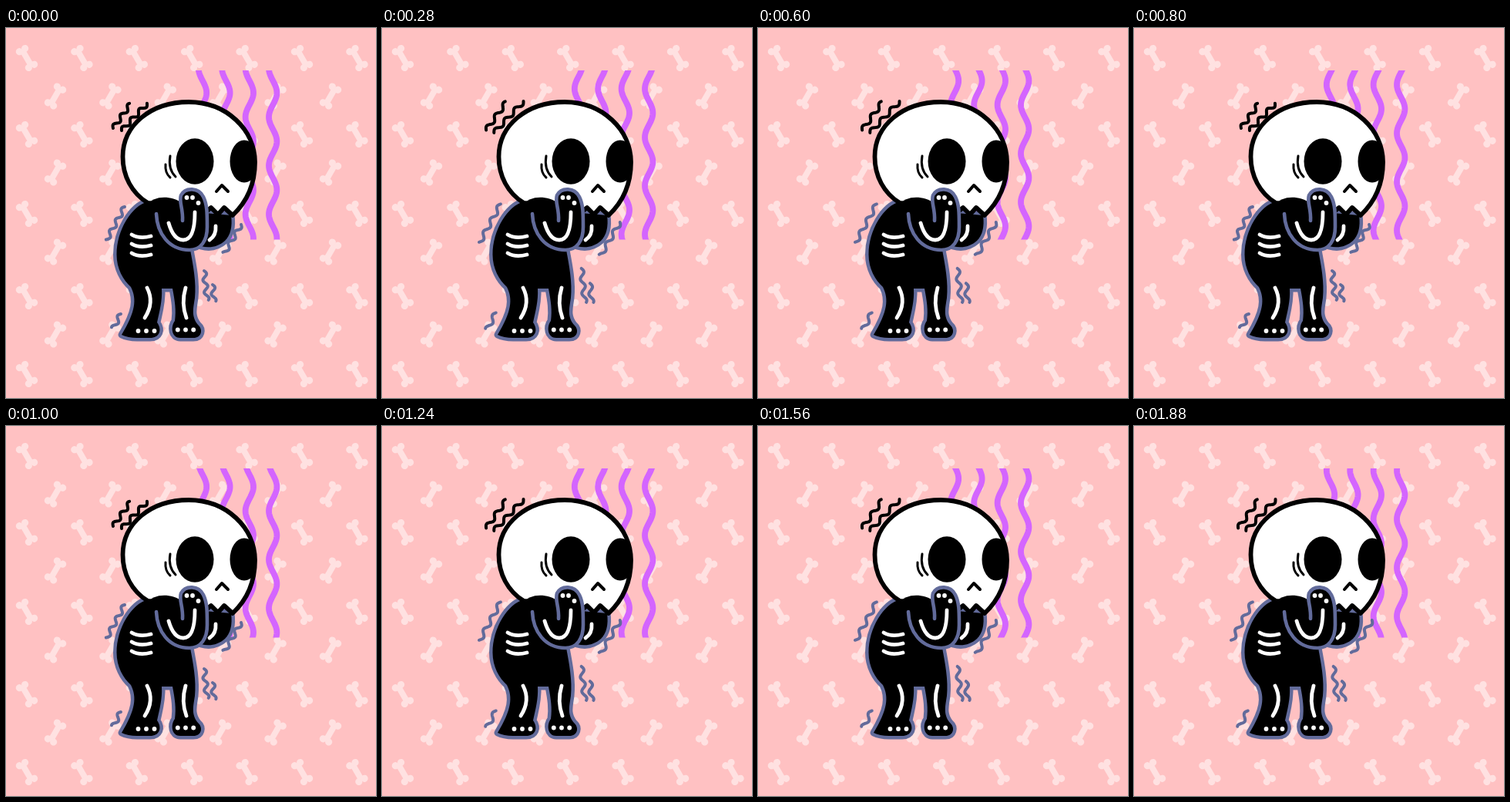
An HTML page that plays this animation: 480x480 px, repeating every 1.92 s.

```html
<!DOCTYPE html>
<html lang="en">
<head>
<meta charset="utf-8">
<title>Shivering skeleton</title>
<style>
  html, body { margin: 0; width: 100%; height: 100%; overflow: hidden; background: #ffc1c2; }
  svg { display: block; width: 100vw; height: 100vh; }
  .line { fill: none; stroke-linecap: round; stroke-linejoin: round; }
  .white { stroke: #fff; stroke-width: 4.8; }
  .ink { stroke: #000; }
  .slate { stroke: #626b9b; }
  .limb { fill: #000; stroke: #626b9b; stroke-width: 9; stroke-linejoin: round; paint-order: stroke; }
</style>
</head>
<body>
<svg viewBox="0 0 480 480">
  <defs>
    <g id="bone" fill="#ffe1e1">
      <rect x="-3.8" y="-13" width="7.6" height="26"/>
      <circle cx="-4.2" cy="-12" r="4.6"/><circle cx="4.2" cy="-12" r="4.6"/>
      <circle cx="-4.2" cy="12" r="4.6"/><circle cx="4.2" cy="12" r="4.6"/>
    </g>
    <clipPath id="band"><rect x="230" y="55" width="140" height="219.5"/></clipPath>
    <clipPath id="face"><use href="#skull"/></clipPath>
    <path id="skull" d="M237 96 C286 96 323 132 323 174 C323 203 312 226 294 243
      L283 233 L275 242 L266 233 L260 238 L226 232 L184 227
      C163 214 151.5 192 151.5 167 C151.5 126 188 96 237 96Z"/>
  </defs>

  <g id="bones"></g>
  <g clip-path="url(#band)"><g id="steam" class="line" stroke="#d465ff" stroke-width="7.8"></g></g>
  <g id="marksIn"></g>
  <g id="marksOut"></g>

  <!-- body and legs -->
  <path class="limb" d="M184 225 C163 231 143.5 262 143.5 294 C143.5 312 152 327 162 336
    C170 352 168 368 150 398 Q158 402 170 402 H187 C199 402 203 392 196 382
    C199 368 203 354 202 338 H216 C219 354 221 366 219 380 C213 388 215 402 226 402
    H243 C254 402 256 391 249 385 C240 374 243 364 245 350 C247 330 243 309 239 288
    L238 224Z"/>

  <!-- far hand -->
  <path class="limb" d="M258 240 L292 243 C294 258 291 269 284 276 C275 284 264 286 253 283Z"/>
  <path class="line white" d="M272 257 Q273 269 264 275"/>

  <!-- head -->
  <use href="#skull" fill="#fff" stroke="#000" stroke-width="5.8" stroke-linejoin="round"/>
  <g clip-path="url(#face)">
    <ellipse cx="245" cy="173" rx="24.5" ry="29.7"/>
    <ellipse cx="309" cy="173" rx="18.5" ry="27.5"/>
  </g>
  <path class="line ink" stroke-width="4" d="M273 212 L280 204 L288 212"/>
  <path class="line ink" stroke-width="3" d="M207 177 Q206 188 213 194 M213 166 Q210 183 220 193"/>

  <!-- shoulder and near arm -->
  <path d="M182 230 C192 217 214 217 228 227 L230 256 L198 264Z"/>
  <path class="line slate" stroke-width="4.6" style="fill:#000" d="M195 241 C196 266 211 288 238 288
    C253 288 261 276 261 258 C261 240 261 229 256 219 C250 207 233 206 227 217
    C224 226 230 234 229 250"/>
  <path class="line white" d="M211 253 C215 267 221 275 230 275 C240 275 245 262 245 239"/>

  <g id="ribs" class="line white"></g>
  <path class="line white" d="M183 337 Q193 356 180 376 M233 337 Q227 357 234 376"/>
  <g id="tips" fill="#fff"></g>
</svg>
<script>
const FRAME = 40, LOOP = 48, RISE = 12, HOLD = 2;
const WAVE = 63, SWAY = 5.2, PEAK = 84;
const $ = id => document.getElementById(id);

function add(parent, tag, attrs) {
  const el = document.createElementNS("http://www.w3.org/2000/svg", tag);
  for (const key in attrs) el.setAttribute(key, attrs[key]);
  return parent.appendChild(el);
}

const toPath = pts => "M" + pts.map(p => p.map(v => v.toFixed(2)).join(" ")).join("L");

// Wallpaper: each row is followed by one tilted the other way, half a column across.
function boneRow(x0, y, tilt) {
  for (let x = x0; x < 470; x += 71.4) {
    add($("bones"), "use", { href: "#bone", transform: `translate(${x} ${y}) rotate(${tilt})` });
  }
}
for (const y of [39, 138, 241, 348, 449]) {
  boneRow(27, y, -30);
  boneRow(64, y + 49.5, 30);
}

// Steam ribbons run one wavelength past the band so they can scroll.
for (let i = 0; i < 4; i++) {
  const pts = [];
  for (let y = 45; y <= 350; y += 2) {
    pts.push([255 + 30.4 * i + SWAY * Math.cos(2 * Math.PI * (y - PEAK) / WAVE), y]);
  }
  add($("steam"), "path", { d: toPath(pts) });
}

for (let y = 268; y < 300; y += 12) add($("ribs"), "path", { d: `M163 ${y}q10 6 25 2` });

// Three fingertip dots; dy drops the last one.
function tips(cx, cy, dx, dy = 0) {
  for (const i of [-1, 0, 1]) {
    add($("tips"), "circle", { cx: cx + i * dx, cy: cy + Math.max(i, 0) * dy, r: 2.9 });
  }
}
tips(182, 393, 10.5);
tips(233, 391.5, 10.2);
tips(242, 220, 7.5, 7);

// Shiver mark: a sine along a line that bulges away from the body first.
// The wide pose is the same mark stretched about its middle and pushed outward.
function shiver(cls, x1, y1, x2, y2) {
  const dx = x2 - x1, dy = y2 - y1, len = Math.hypot(dx, dy);
  const cx = (x1 + x2) / 2, cy = (y1 + y2) / 2;
  const side = cx < 210 ? -1 : 1, amp = -2.8 * side * Math.sign(dy);
  const pose = (id, stretch, push) => {
    const pts = [];
    for (let k = 0; k <= 1; k += 0.025) {
      const along = (k - 0.5) * stretch, s = amp * Math.sin(2 * Math.PI * k * len / 16);
      pts.push([cx + push * side + dx * along - dy / len * s, cy + dy * along + dx / len * s]);
    }
    add($(id), "path", { d: toPath(pts), class: "line " + cls, "stroke-width": 4 });
  };
  pose("marksIn", 1, 0);
  pose("marksOut", 1.16, 2);
}
shiver("ink", 139, 130, 162, 98);
shiver("ink", 150, 133, 184, 97);
shiver("slate", 154, 232, 130, 276);
shiver("slate", 305, 255, 283, 293);
shiver("slate", 257, 315, 261, 354);
shiver("slate", 268, 333, 270, 355);
shiver("slate", 149, 371, 139, 390);

function draw(now) {
  const step = Math.floor(now / FRAME) % LOOP;
  const wide = Math.floor(step / HOLD) % 2 === 1;
  $("steam").setAttribute("transform", `translate(0 ${-WAVE * (step % RISE) / RISE})`);
  $("marksIn").style.display = wide ? "none" : "";
  $("marksOut").style.display = wide ? "" : "none";
}

const start = performance.now();
function tick() {
  draw(performance.now() - start);
  requestAnimationFrame(tick);
}
tick();
</script>
</body>
</html>
```
